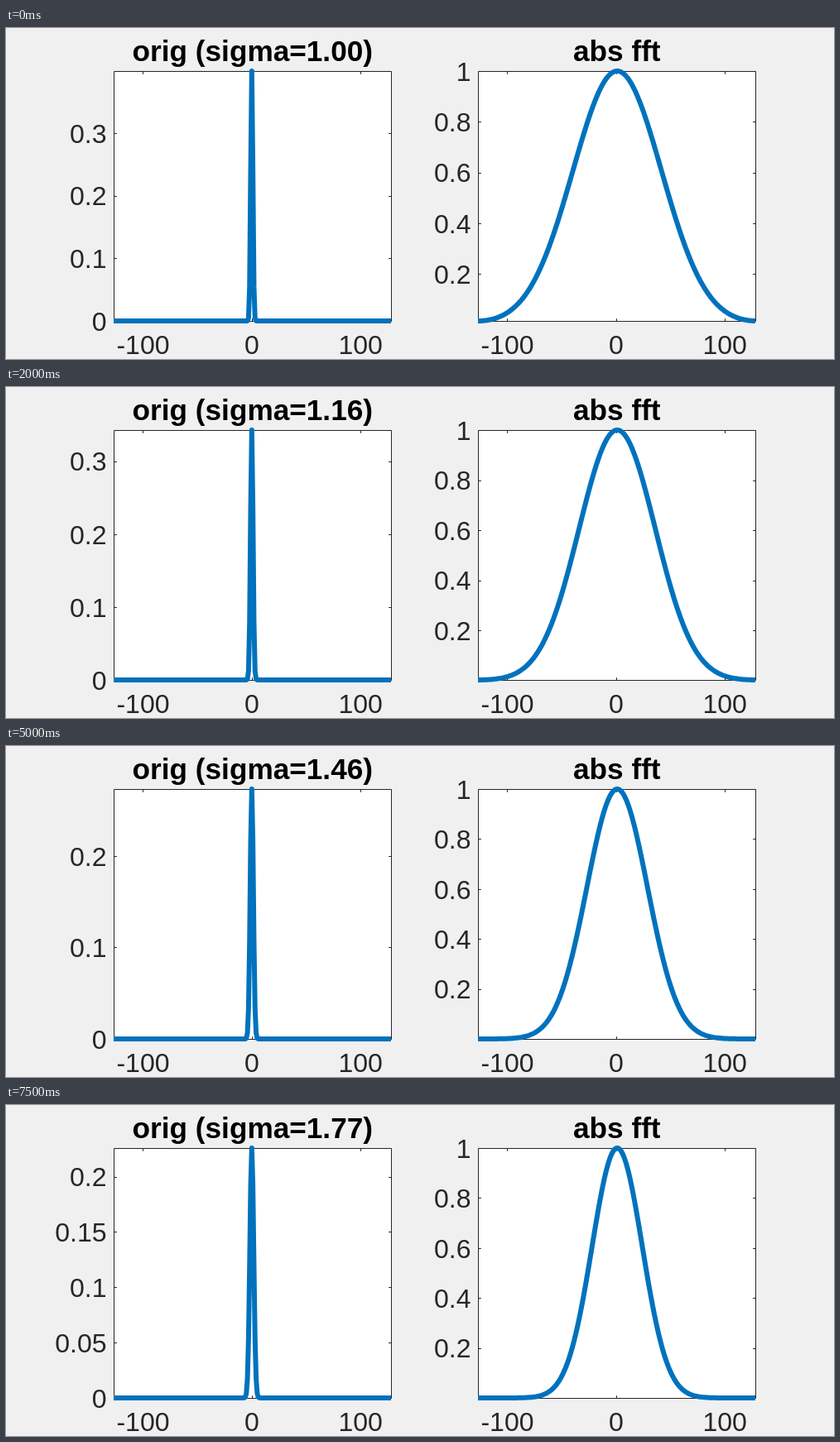
Recreate the animation shown at these times as an HTML page. Size 1000x400 px, loop 8000 ms.

```html
<!DOCTYPE html>
<html lang="en">
<head>
<meta charset="utf-8">
<title>Gaussian and its spectrum</title>
<style>
  html, body { margin: 0; width: 100%; height: 100%; overflow: hidden; background: #f0f0f0; }
  svg { display: block; width: 100vw; height: 100vh; }
  text { font-family: "Liberation Sans", Arial, Helvetica, sans-serif; font-size: 32px; fill: #262626; }
  .title { font-size: 35.2px; font-weight: bold; fill: #000; text-anchor: middle; }
  .xlabel { text-anchor: middle; }
  .ylabel { text-anchor: end; }
  .axis { fill: none; stroke: #262626; stroke-width: 1; }
  .curve { fill: none; stroke: #0072bd; stroke-width: 6; stroke-linejoin: round; }
</style>
</head>
<body>
<svg id="stage" viewBox="0 0 1000 400"></svg>
<script>
const LOOP = 8000, STEP = 500;
const TOP = 52, BOTTOM = 354, WIDTH = 335;
const X_MIN = -127, X_MAX = 128, N = 256;
const X_TICKS = [-100, 0, 100];
const TICK = 3.35;

const stage = document.getElementById('stage');

function add(parent, name, attrs = {}, text = '') {
  const el = document.createElementNS('http://www.w3.org/2000/svg', name);
  for (const key in attrs) el.setAttribute(key, attrs[key]);
  el.textContent = text;
  parent.appendChild(el);
  return el;
}

const crisp = v => Math.round(v) + 0.5;

function makePlot(left) {
  const right = left + WIDTH;
  const toX = x => left + (x - X_MIN) / (X_MAX - X_MIN) * WIDTH;

  add(stage, 'rect', { x: left, y: TOP, width: WIDTH, height: BOTTOM - TOP, fill: '#fff' });
  let frame = `M${left + .5} ${TOP + .5}H${right + .5}V${BOTTOM + .5}H${left + .5}Z`;
  for (const v of X_TICKS) {
    const x = crisp(toX(v));
    frame += `M${x} ${TOP + .5}v${TICK}M${x} ${BOTTOM + .5}v${-TICK}`;
    add(stage, 'text', { class: 'xlabel', x: toX(v), y: 393.5 }, v);
  }
  add(stage, 'path', { class: 'axis', d: frame });
  const ticks = add(stage, 'path', { class: 'axis' });
  const labels = add(stage, 'g');
  const curve = add(stage, 'path', { class: 'curve' });
  const title = add(stage, 'text', { class: 'title', x: left + WIDTH / 2 + .3, y: 40 });

  return (name, fn, min, max, step) => {
    const toY = v => BOTTOM - (v - min) / (max - min) * (BOTTOM - TOP);
    title.textContent = name;

    let d = '';
    for (let x = X_MIN; x <= X_MAX; x++) {
      d += `${d ? 'L' : 'M'}${toX(x).toFixed(2)} ${toY(fn(x)).toFixed(2)}`;
    }
    curve.setAttribute('d', d);

    let marks = '';
    labels.replaceChildren();
    for (let i = Math.ceil(min / step); i * step <= max + 1e-6; i++) {
      const y = toY(i * step);
      marks += `M${left + .5} ${crisp(y)}h${TICK}M${right + .5} ${crisp(y)}h${-TICK}`;
      add(labels, 'text', { class: 'ylabel', x: left - 8.5, y: y + 11.7 }, +(i * step).toFixed(2));
    }
    ticks.setAttribute('d', marks);
  };
}

const drawSignal = makePlot(130);
const drawSpectrum = makePlot(570);

function draw(k) {
  const sigma = 2 ** (7 * k / 128);
  const peak = 1 / (sigma * Math.sqrt(2 * Math.PI));
  const signal = x => peak * Math.exp(-x * x / (2 * sigma * sigma));

  // Sampled spectrum, with the neighbouring aliases folded in.
  const spectrum = x => {
    let sum = 0;
    for (let j = -1; j <= 1; j++) {
      const w = 2 * Math.PI * sigma * ((x - 1) / N + j);
      sum += Math.exp(-w * w / 2);
    }
    return sum;
  };

  drawSignal(`orig (sigma=${sigma.toFixed(2)})`, signal, 0, peak, peak < 0.25 ? 0.05 : 0.1);
  drawSpectrum('abs fft', spectrum, spectrum(X_MIN), 1, 0.2);
}

let shown = -1;
const start = performance.now();

function tick(now) {
  const k = Math.floor(Math.max(0, now - start) % LOOP / STEP);
  if (k !== shown) draw(shown = k);
  requestAnimationFrame(tick);
}
tick(start);
</script>
</body>
</html>
```
